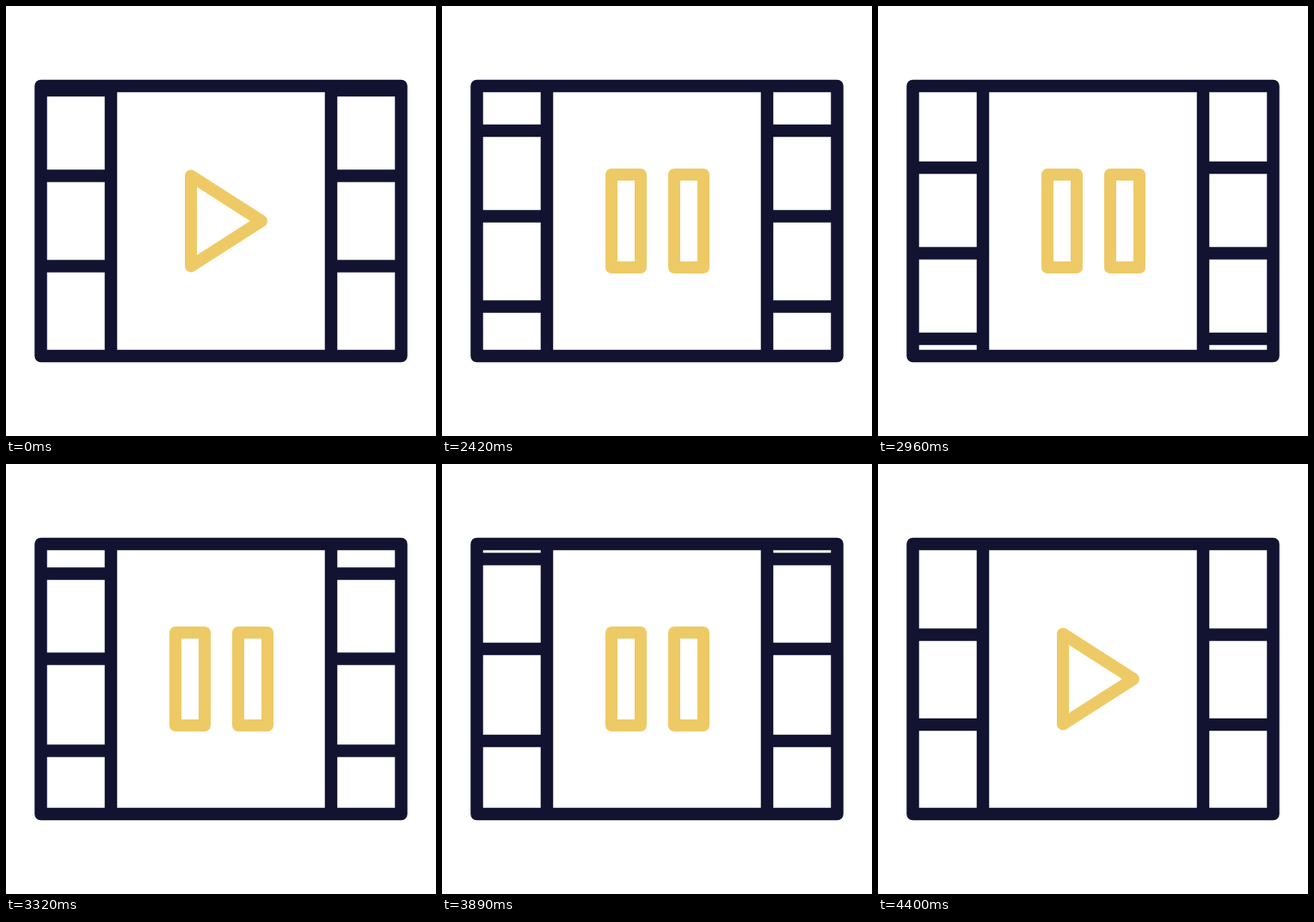
These frames come from a looping animation (500x500 px, 4430 ms). An HTML page with a canvas:

```html
<!DOCTYPE html>
<html lang="en">
<head>
<meta charset="utf-8">
<title>Film strip player</title>
<style>
  html, body { margin: 0; width: 100%; height: 100%; overflow: hidden; background: #fff; }
  canvas { display: block; }
</style>
</head>
<body>
<canvas id="stage" width="500" height="500"></canvas>
<script>
const ctx = document.getElementById('stage').getContext('2d');
const LOOP = 4430, START = 2030, STEP = 30;
const NAVY = '#121331', GOLD = '#eeca66';

// Rest positions of the film perforation bars; the strip scrolls down past the frame.
const BARS = [302.5, 197.5, 98, -1.5, -108.5, -207.5, -314.5, -419];
// Scroll curve: time, distance, speed (px per ms).
const SCROLL = [
  [2000, 0, 0], [2420, 47, 0.19], [2960, 189.6, 0.33],
  [3320, 335, 0.39], [3890, 529.5, 0.26], [4400, 617.5, 0]
];
// Corners of the play triangle (tip doubled) and of the left pause bar.
const PLAY = [[215, 197.5], [297, 250], [297, 250], [215, 302.5]];
const PAUSE = [[197, 196], [231, 196], [231, 304], [197, 304]];

const clamp = x => Math.min(1, Math.max(0, x));
const ramp = (t, from) => clamp((t - from) / 200);
const dip = (t, peak) => clamp(1 - Math.abs(t - peak) / 200);

function scrollAt(t) {
  if (t <= SCROLL[0][0]) return 0;
  const i = SCROLL.findIndex(key => t <= key[0]);
  const [t0, y0, v0] = SCROLL[i - 1], [t1, y1, v1] = SCROLL[i];
  const span = t1 - t0, u = (t - t0) / span, ease = u * u * (3 - 2 * u);
  return y0 + (y1 - y0) * ease
    + span * u * (1 - u) * (v0 * (1 - u) - v1 * u);
}

function line(x1, y1, x2, y2) {
  ctx.beginPath();
  ctx.moveTo(x1, y1);
  ctx.lineTo(x2, y2);
  ctx.stroke();
}

function polygon(points, dx) {
  ctx.beginPath();
  points.forEach(([x, y]) => ctx.lineTo(x + dx, y));
  ctx.closePath();
  ctx.stroke();
}

function drawStrip(scroll) {
  ctx.strokeStyle = NAVY;
  ctx.lineWidth = 14.5;
  ctx.save();
  ctx.beginPath();
  ctx.rect(40, 93, 420, 314);
  ctx.clip();
  for (const rest of BARS) {
    const y = rest + scroll;
    line(40, y, 122, y);
    line(378, y, 460, y);
  }
  ctx.restore();
  line(122, 93, 122, 407);
  line(378, 93, 378, 407);
  ctx.strokeRect(40.5, 93, 419, 314);
}

function drawIcon(morph, split) {
  const shape = PLAY.map(([x, y], i) => [
    x + (PAUSE[i][0] - x) * morph,
    y + (PAUSE[i][1] - y) * morph
  ]);
  ctx.strokeStyle = GOLD;
  ctx.lineWidth = 14;
  polygon(shape, 0);
  if (split > 0) polygon(shape, 73 * split);
}

function draw(now) {
  const time = now % LOOP;
  const t = time < START ? 0 : time - (time - START) % STEP;
  const scale = 1 - 0.087 * (dip(t, 2200) + dip(t, 4200));

  ctx.setTransform(1, 0, 0, 1, 0, 0);
  ctx.fillStyle = '#fff';
  ctx.fillRect(0, 0, 500, 500);
  ctx.translate(250, 250);
  ctx.scale(scale, scale);
  ctx.translate(-250, -250);
  ctx.lineJoin = 'round';

  drawStrip(scrollAt(t));
  drawIcon(ramp(t, 2000) - ramp(t, 4200), ramp(t, 2200) - ramp(t, 4000));
}

const begin = performance.now();
function tick() {
  draw(performance.now() - begin);
  requestAnimationFrame(tick);
}
tick();
</script>
</body>
</html>
```
